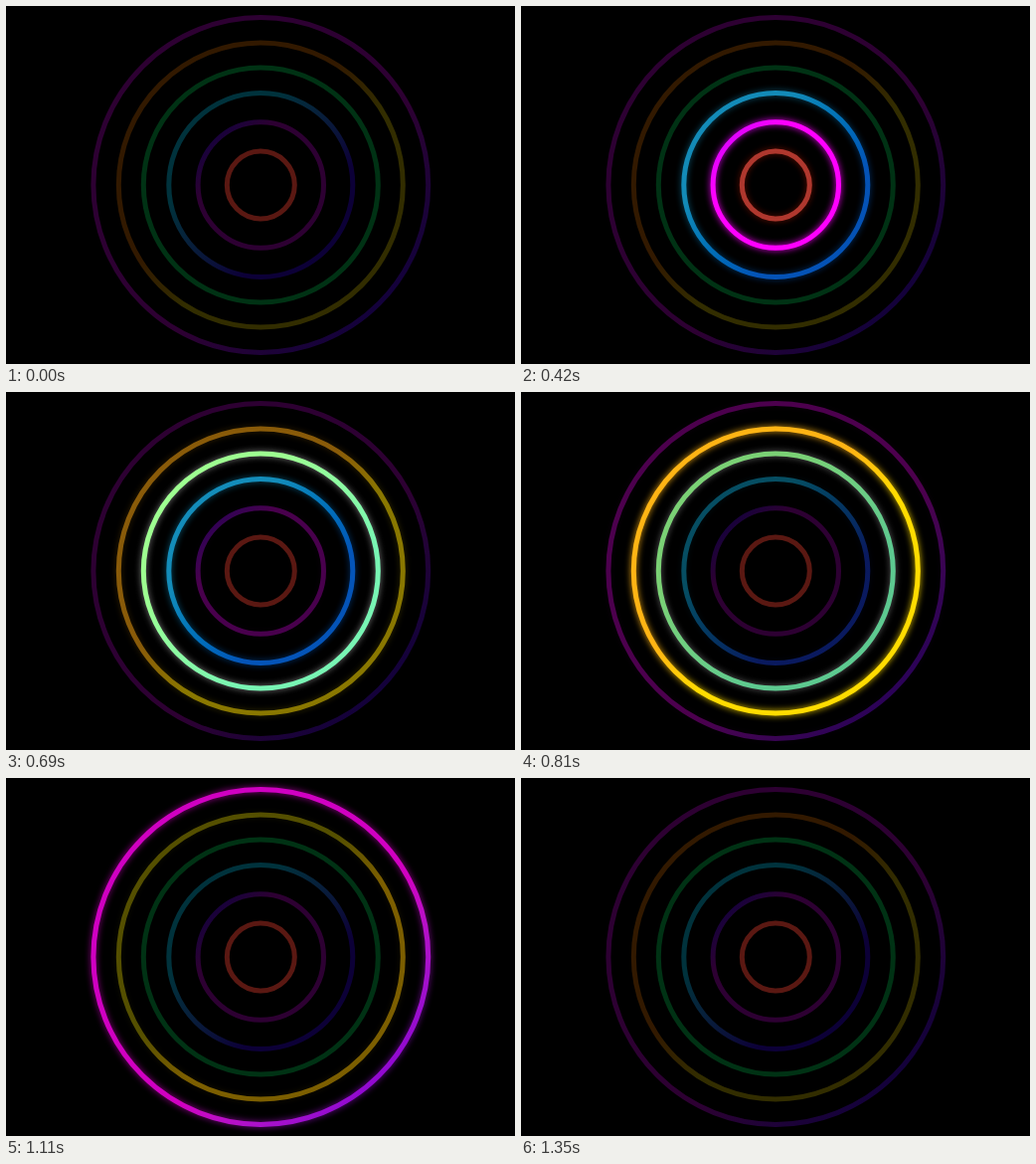
Animation of 512x360 px, one loop 1440 ms. Source, as an HTML page:

```html
<!DOCTYPE html>
<html lang="en">
<head>
<meta charset="utf-8">
<title>Neon rings</title>
<style>
@property --lit { syntax: "<number>"; inherits: true; initial-value: 0; }

html, body { margin: 0; width: 100%; height: 100%; overflow: hidden; background: #000; }
svg { display: block; width: 512px; height: 360px; }

.ring { animation: pulse 1440ms linear var(--delay) infinite; }
circle { fill: none; stroke-width: 5; }
.glow { stroke-width: 6; filter: blur(3px); opacity: calc(var(--lit) * .75); }

.a { stop-color: color-mix(in srgb, var(--a-on) calc(var(--lit) * 100%), var(--a-off)); }
.b { stop-color: color-mix(in srgb, var(--b-on) calc(var(--lit) * 100%), var(--b-off)); }

/* the amber ring swaps its hues while it fades */
.amber .a { animation: amber-a 1440ms linear var(--delay) infinite; }
.amber .b { animation: amber-b 1440ms linear var(--delay) infinite; }

@keyframes pulse {
  0% { --lit: 0; }
  2.08% { --lit: .14; }
  6.25% { --lit: .63; }
  12.5%, 16.67% { --lit: 1; }
  22.92% { --lit: .78; }
  27.08% { --lit: .52; }
  33.33% { --lit: .2; }
  39.58%, 100% { --lit: 0; }
}
@keyframes amber-a {
  0%, 39.58%, 100% { stop-color: #321900; }
  6.25% { stop-color: #b37a0d; }
  12.5%, 14.6% { stop-color: #ffb414; }
  22.92% { stop-color: #b4a000; }
  33.33% { stop-color: #555000; }
}
@keyframes amber-b {
  0%, 39.58%, 100% { stop-color: #322d00; }
  6.25% { stop-color: #b39b00; }
  12.5%, 14.6% { stop-color: #ffdc00; }
  22.92% { stop-color: #f0b400; }
  33.33% { stop-color: #7d5f00; }
}
</style>
</head>
<body>
<svg id="stage" viewBox="0 0 512 360"></svg>
<script>
const LOOP = 1440, FIRST = 30, STAGGER = 150;

// on/off: colours at the upper left and lower right; span: gradient stops in %
const rings = [
  { r: 34, on: ["#ff5548", "#ff5548"], off: ["#5a1812", "#5a1812"], span: [30, 70], glow: "#d02000" },
  { r: 63.2, on: ["#dc00ff", "#ff00ff"], off: ["#14003c", "#2d0032"], span: [10, 30] },
  { r: 92.5, on: ["#1ebeff", "#0082ff"], off: ["#00323c", "#0c0037"], span: [30, 70] },
  { r: 118, on: ["#9eff91", "#78f5b4"], off: ["#003214", "#003214"], span: [30, 70], glow: "#888" },
  { r: 143, on: ["#ffb414", "#ffdc00"], off: ["#321900", "#322d00"], span: [42, 58], name: "amber" },
  { r: 168.4, on: ["#ff00eb", "#aa00ff"], off: ["#2d0032", "#0f003c"], span: [60, 90] }
];

const ringMarkup = ({ r, on, off, span, glow, name = "" }, i) => {
  const paint = `url(#hue${i})`;
  const circle = (cls, stroke) =>
    `<circle class="${cls}" cx="256.3" cy="180" r="${r}" stroke="${stroke}"/>`;
  const vars = `--delay:${FIRST + STAGGER * i - LOOP}ms;` +
    `--a-on:${on[0]};--b-on:${on[1]};--a-off:${off[0]};--b-off:${off[1]}`;
  return `<g class="ring ${name}" style="${vars}">
    <linearGradient id="hue${i}" x2="1" y2="1">
      <stop class="a" offset="${span[0]}%"/><stop class="b" offset="${span[1]}%"/>
    </linearGradient>
    ${circle("glow", glow || paint)}${circle("line", paint)}
  </g>`;
};

document.getElementById("stage").innerHTML = rings.map(ringMarkup).join("");
</script>
</body>
</html>
```
